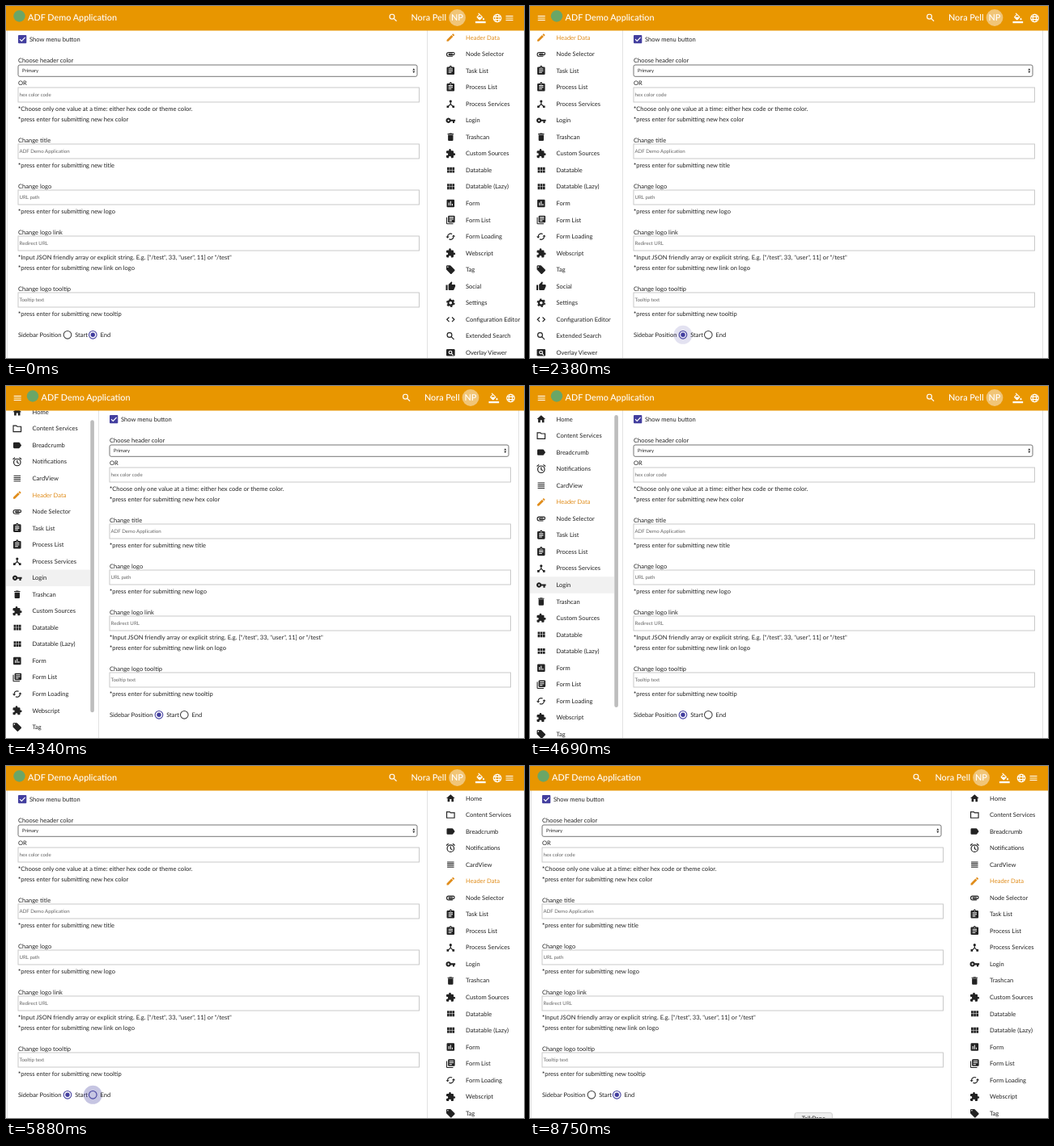
Recreate the animation shown at these times as an HTML page. Size 640 by 436 pixels, loop 8820 ms.

```html
<!DOCTYPE html>
<html lang="en">
<head>
<meta charset="utf-8">
<title>Sidebar position demo</title>
<style>
  html, body { margin: 0; width: 100%; height: 100%; overflow: hidden; background: #fff; }
  svg { display: block; width: 100vw; height: 100vh; font: 7.55px Lato, sans-serif; fill: #222; text-rendering: geometricPrecision; }
  .line { fill: none; stroke: currentColor; stroke-width: 2.2; }
  .icon { color: #222; fill: currentColor; }
  .active { color: #e08d1c; fill: #e08d1c; }
  .bar, .bar .icon { color: #fff; fill: #fff; }
  .bar text { font-size: 10.85px; font-weight: 500; }
  .hint { font-size: 6.15px; fill: #666; }
  .box { fill: #fff; stroke: #c4c4c4; stroke-width: .9; }
</style>
</head>
<body>
<svg id="stage" viewBox="0 0 640 436"></svg>
<script>
const LOOP = 8820, ROW = 20.54, INDIGO = '#433f9f';
const path = d => `<path d="${d}"/>`;
const line = d => `<path class="line" d="${d}"/>`;
const text = (x, y, s, extra = '') => `<text x="${x}" y="${y}" ${extra}>${s}</text>`;

const icons = {
  home: path('M10 20v-6h4v6h5v-8h3L12 3 2 12h3v8z'),
  folder: line('M3 5h7l2 2h9v12H3z'),
  label: path('M5 5h11q1 0 1.6.8L22 12l-4.4 6.2q-.6.8-1.6.8H5q-2 0-2-2V7q0-2 2-2z'),
  alarm: '<circle class="line" cx="12" cy="13" r="8"/>' + line('M12 8v5.5l4 2.4M2 6l5-4M22 6l-5-4'),
  lines: path('M4 5h16v2H4zM4 9h16v2H4zM4 13h16v2H4zM4 17h16v2H4z'),
  edit: path('M3 17.25V21h3.75L17.81 9.94l-3.75-3.75zM20.71 7.04q.7-.7 0-1.41l-2.34-2.34q-.7-.7-1.41 0l-1.83 1.83 3.75 3.75z'),
  clip: line('M17 17H7.5a4.5 4.5 0 0 1 0-9H18a3 3 0 0 1 0 6H9.5a1.5 1.5 0 0 1 0-3H17'),
  task: '<path fill-rule="evenodd" d="M5 3h4a3 3 0 0 1 6 0h4q2 0 2 2v14q0 2-2 2H5q-2 0-2-2V5q0-2 2-2zM7 7v2h10V7zM7 11v2h10v-2zM7 15v2h7v-2zM11 3v2h2V3z"/>',
  hub: '<circle cx="12" cy="6" r="3"/>' + path('M3 16h5v5H3zM16 16h5v5h-5z') + line('M12 8v4.5l-6 6M12 12.5l6 6'),
  key: '<path fill-rule="evenodd" d="M12.65 10a6 6 0 1 0 0 4H17v4h4v-4h2v-4zM7 14a2 2 0 1 1 0-4 2 2 0 0 1 0 4z"/>',
  trash: path('M6 7h12v12q0 2-2 2H8q-2 0-2-2zM19 4h-3.5l-1-1h-5l-1 1H5v2h14z'),
  puzzle: path('M20.5 11H19V7q0-2-2-2h-4V3.5a2.5 2.5 0 0 0-5 0V5H4Q2 5 2 7v3.8h1.5a2.7 2.7 0 0 1 0 5.4H2V20q0 2 2 2h3.8v-1.5a2.7 2.7 0 0 1 5.4 0V22H17q2 0 2-2v-4h1.5a2.5 2.5 0 0 0 0-5z'),
  grid: path('M4 5h5v6H4zM10 5h5v6h-5zM16 5h5v6h-5zM4 12h5v6H4zM10 12h5v6h-5zM16 12h5v6h-5z'),
  poll: '<path fill-rule="evenodd" d="M5 3h14q2 0 2 2v14q0 2-2 2H5q-2 0-2-2V5q0-2 2-2zM7 10v7h2v-7zM11 7v10h2V7zM15 13v4h2v-4z"/>',
  books: '<path fill-rule="evenodd" d="M8 2h12q2 0 2 2v12q0 2-2 2H8q-2 0-2-2V4q0-2 2-2zM9 5v2h10V5zM9 9v2h10V9zM9 13v2h6v-2z"/>' + path('M2 6h2v14h14v2H4q-2 0-2-2z'),
  cached: line('M19 11v1a7 7 0 0 1-10.5 6M5 13v-1a7 7 0 0 1 10.5-6') + path('M15 12h8l-4-4zM1 12h8l-4 4z'),
  tag: '<path fill-rule="evenodd" d="M21.4 11.6l-9-9Q11.8 2 11 2H4Q2 2 2 4v7q0 .8.6 1.4l9 9q1.4 1.2 2.8 0l7-7q1.2-1.4 0-2.8zM5.5 7a1.5 1.5 0 1 1 0-3 1.5 1.5 0 0 1 0 3z"/>',
  thumb: path('M1 9h4v12H1zM23 10q0-2-2-2h-6.3l1-4.9q0-.6-.5-1L14.2 1 7.6 7.6Q7 8.2 7 9v10q0 2 2 2h9q1.3 0 1.8-1.2l3-7q.2-.4.2-.8z'),
  gear: '<circle class="line" cx="12" cy="12" r="5.4" style="stroke-width:4"/><circle class="line" cx="12" cy="12" r="8.5" stroke-dasharray="4.45" style="stroke-width:3"/>',
  code: line('M8.7 6.7L3.4 12l5.3 5.3M15.3 6.7l5.3 5.3-5.3 5.3'),
  search: '<circle class="line" cx="9.5" cy="9.5" r="5.5"/>' + line('M13.5 13.5l6.5 6.5'),
  page: path('M4 4h16q2 0 2 2v12q0 2-2 2H4q-2 0-2-2V6q0-2 2-2z') + '<g style="color:#fff"><circle class="line" cx="11.5" cy="11.5" r="3.5"/>' + line('M14 14l4 4') + '</g>',
  bucket: '<path fill-rule="evenodd" d="M7.6 0L6.2 1.4l2.4 2.4-5.2 5.1q-.8 1.1 0 2.2l5.5 5.5q1.1.8 2.2 0l5.5-5.5q.8-1.1 0-2.2zM5.2 10L10 5.2l4.8 4.8zM19 11.5s-2 2.2-2 3.5a2 2 0 0 0 4 0c0-1.300-2-3.500-2-3.500zM0 20h24v4H0z"/>',
  globe: '<g style="stroke-width:1.8"><circle class="line" cx="12" cy="12" r="9"/><ellipse class="line" cx="12" cy="12" rx="4" ry="9"/></g>' + line('M4 9h16M4 15h16'),
  menu: path('M3 6h18v2H3zM3 11h18v2H3zM3 16h18v2H3z')
};
const icon = (name, x, y, scale = .53, extra = '') =>
  `<g class="icon" ${extra} transform="translate(${x} ${y}) scale(${scale}) translate(-12 -12)">${icons[name]}</g>`;

const items = [
  ['Home', 'home'], ['Content Services', 'folder'], ['Breadcrumb', 'label'], ['Notifications', 'alarm'],
  ['CardView', 'lines'], ['Header Data', 'edit'], ['Node Selector', 'clip'], ['Task List', 'task'],
  ['Process List', 'task'], ['Process Services', 'hub'], ['Login', 'key'], ['Trashcan', 'trash'],
  ['Custom Sources', 'puzzle'], ['Datatable', 'grid'], ['Datatable (Lazy)', 'grid'], ['Form', 'poll'],
  ['Form List', 'books'], ['Form Loading', 'cached'], ['Webscript', 'puzzle'], ['Tag', 'tag'],
  ['Social', 'thumb'], ['Settings', 'gear'], ['Configuration Editor', 'code'],
  ['Extended Search', 'search'], ['Overlay Viewer', 'page']
];
const menuItems = items.map(([name, glyph], i) => {
  const y = 40 + i * ROW, active = name === 'Header Data';
  const row = icon(glyph, 13.8, y) + text(32.5, y + 2.5, name);
  return active ? `<g class="active">${row.replace('class="icon"', 'class="icon active"')}</g>` : row;
}).join('');

const input = (y, hint) =>
  `<rect class="box" x="15" y="${y}" width="495.5" height="18"/>` + text(16.5, y + 11.2, hint, 'class="hint"');
const note = (y, s) => text(15, y, `<tspan font-weight="700">*</tspan>${s}`);
const submitNote = (y, what) => note(y, `press enter for submitting new ${what}`);
const radio = (id, x, label) => `
  <circle id="${id}Ripple" cx="${x}" cy="407.3" fill="${INDIGO}"/>
  <circle id="${id}Ring" cx="${x}" cy="407.3" r="4.8" fill="none" stroke-width="1.1"/>
  <circle id="${id}Dot" cx="${x}" cy="407.3" fill="${INDIGO}"/>` + text(x + 9.2, 409.8, label);

const form = `
  <path d="M1.500 30V436M520.500 30V436" stroke="#e2e2e2" fill="none"/>
  <rect x="15" y="36" width="10.300" height="10.300" rx="1" fill="${INDIGO}"/>
  <path d="M17 41.200l2.300 2.300 4.300-4.600" stroke="#fff" stroke-width="1.200" fill="none"/>`
  + text(29, 43.6, 'Show menu button')
  + text(15, 70.2, 'Choose header color')
  + '<rect x="15" y="73" width="493" height="14.300" rx="2" fill="#fff" stroke="#666" stroke-width=".9"/>'
  + text(20, 82.3, 'Primary', 'style="font-size:5.9px"')
  + path('M502.300 79.500l1.500-2.200 1.500 2.200zM502.300 80.700l1.500 2.200 1.500-2.200z')
  + text(15, 98.3, 'OR') + input(101, 'hex color code')
  + note(129.8, 'Choose only one value at a time: either hex code or theme color.') + submitNote(142.6, 'hex color')
  + text(15, 168.5, 'Change title') + input(171, 'ADF Demo Application') + submitNote(199.8, 'title')
  + text(15, 225.5, 'Change logo') + input(228, 'URL path') + submitNote(256.8, 'logo')
  + text(15, 282.5, 'Change logo link') + input(285, 'Redirect URL')
  + note(313.8, 'Input JSON friendly array or explicit string. E.g. ["/test", 33, "user", 11] or "/test"')
  + submitNote(326.6, 'link on logo')
  + text(15, 352.5, 'Change logo tooltip') + input(355, 'Tooltip text') + submitNote(383.8, 'tooltip')
  + text(15, 409.8, 'Sidebar Position') + radio('start', 76, 'Start') + radio('end', 107.3, 'End');

const toolbar = `
  <rect width="640" height="30.500" fill="#e89600"/>
  <g id="tools">
    <circle cx="16.500" cy="12.500" r="7.200" fill="#6aa667"/>`
  + text(27, 18.3, 'ADF Demo Application')
  + icon('search', 478.3, 14.5) + text(544, 18.3, 'Nora Pell', 'text-anchor="end"')
  + '<circle cx="557.500" cy="14.500" r="10.400" fill="#f1c577"/>'
  + text(557.5, 18.2, 'NP', 'text-anchor="middle"')
  + icon('bucket', 586.3, 14.8) + icon('globe', 607, 15) + '</g>'
  + icon('menu', 0, 0, .5, 'id="menuButton"');

const $ = id => document.getElementById(id);
$('stage').innerHTML = `
  <rect width="640" height="436" fill="#fff"/>
  <g id="form">${form}</g>
  <g id="sidebar">
    <rect id="hover" x="-2.500" width="106.500" height="${ROW}" fill="#f1f1f1"/>
    <g id="items">${menuItems}</g>
    <rect id="thumb" x="104.300" width="4.600" height="362" rx="2.300" fill="#bdbdbd"/>
  </g>
  <g id="dockLabel"><rect x="327" y="429.500" width="46.500" height="14" rx="2.500" fill="#efefef" stroke="#c8c8c8" stroke-width=".8"/>
  ${text(350.3, 438.6, 'TalkPane', 'text-anchor="middle"')}</g>
  <g class="bar">${toolbar}</g>`;

const set = (id, attrs) => { for (const k in attrs) $(id).setAttribute(k, attrs[k]); };
const within = (t, a, b) => t >= a && t < b;

// Smoothly interpolates through [time, value] keys.
function track(t, keys) {
  if (t <= keys[0][0]) return keys[0][1];
  for (let i = 1; i < keys.length; i++) {
    const [t0, a] = keys[i - 1], [t1, b] = keys[i];
    if (t < t1) {
      const u = (t - t0) / (t1 - t0);
      return a + (b - a) * u * u * (3 - 2 * u);
    }
  }
  return keys[keys.length - 1][1];
}

function drawRadio(id, t, press, on, off) {
  const dot = track(t, [[on, 0], [on + 120, 2.7]]) - track(t, [[off, 0], [off + 120, 2.7]]);
  const selected = id === 'start' ? dot : 2.7 + dot;
  const rippling = within(t, press, press + 700);
  set(id + 'Ripple', {
    r: track(t, [[press, 0], [press + 130, 11.5]]),
    'fill-opacity': rippling ? track(t, [[press + 280, .3], [press + 700, 0]]) : 0
  });
  set(id + 'Dot', { r: Math.max(0, selected) });
  set(id + 'Ring', { stroke: rippling || selected > .1 ? INDIGO : '#444' });
}

function draw(t) {
  const left = within(t, 2090, 5870);
  const scroll = track(t, [[3800, 103.6], [4480, -4], [4800, 0]]);
  const pointerY = t < 6000
    ? track(t, [[2700, 400], [3400, 244], [4950, 244], [5250, 330]])
    : track(t, [[6700, 400], [7300, 142], [7900, 142], [8200, 300]]);
  const hovering = within(t, 2700, 5150) || within(t, 6700, 8120);
  const row = Math.round((pointerY + scroll - 40) / ROW);

  set('form', { transform: `translate(${left ? 113 : 0})` });
  set('sidebar', { transform: `translate(${left ? 0 : 535.5})` });
  set('items', { transform: `translate(0 ${-scroll})` });
  set('hover', { y: 40 + (row - .5) * ROW - scroll, opacity: hovering ? 1 : 0 });
  set('thumb', {
    y: 36 + Math.max(0, scroll) * .82,
    opacity: left ? track(t, [[3600, 0], [3720, 1]]) - track(t, [[5200, 0], [5400, 1]]) : 0
  });
  set('tools', { transform: `translate(${left ? 16.5 : 0})` });
  set('menuButton', { transform: `translate(${left ? 14.2 : 622} 15) scale(.5) translate(-12 -12)` });
  set('dockLabel', { opacity: t >= 8680 ? 1 : 0 });
  drawRadio('start', t, 1890, 2130, 5910);
  drawRadio('end', t, 5740, 5910, 2130);
}

const begin = performance.now();
function tick() {
  draw((performance.now() - begin) % LOOP);
  requestAnimationFrame(tick);
}
tick();
</script>
</body>
</html>
```
